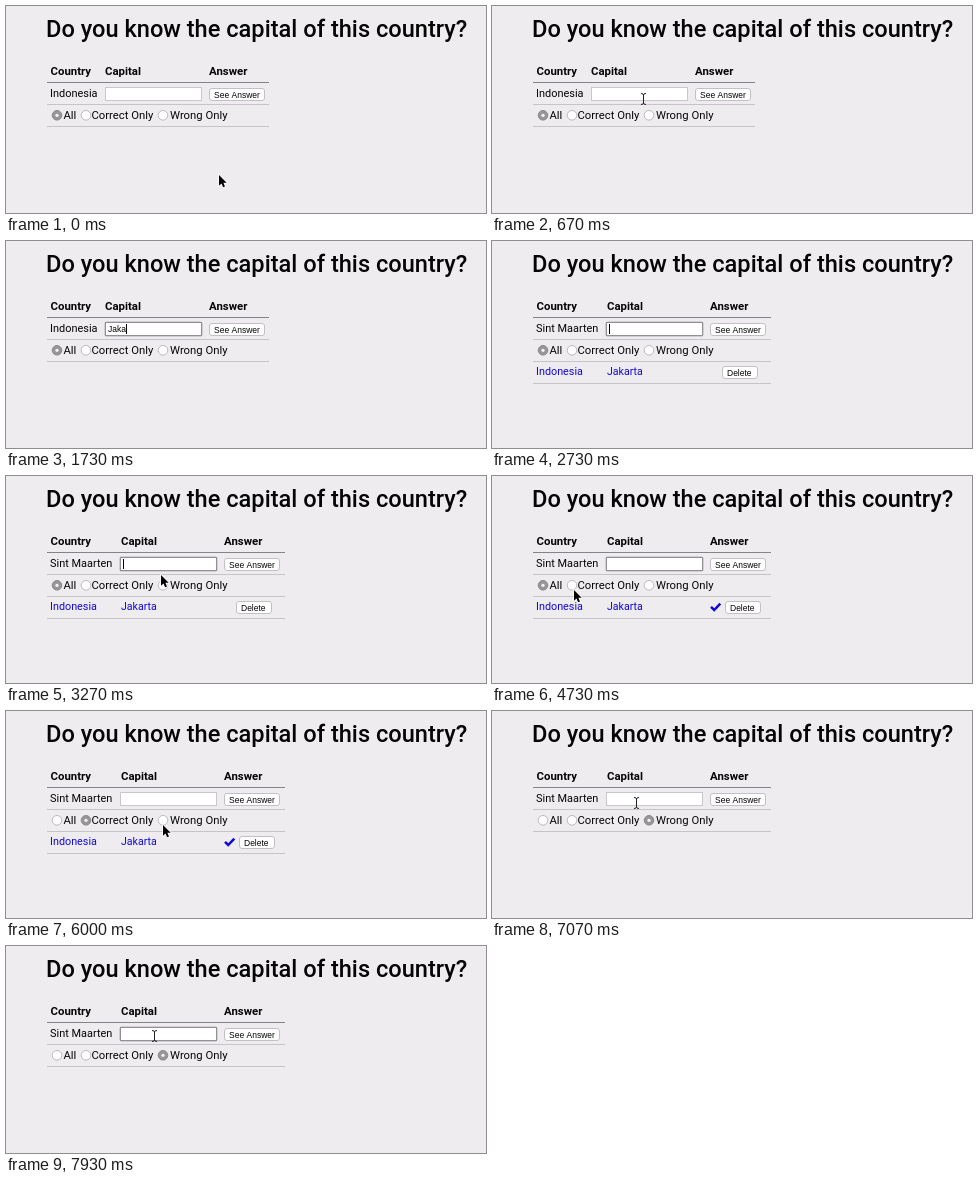
An HTML page with a canvas that plays this animation: 480x207 px, repeating every 8 s.

```html
<!DOCTYPE html>
<html lang="en">
<head>
<meta charset="utf-8">
<title>Capital quiz</title>
<style>
  html, body { margin: 0; width: 100%; height: 100%; overflow: hidden; background: #eeecef; }
  canvas { display: block; width: 480px; height: 207px; }
</style>
</head>
<body>
<canvas id="stage"></canvas>
<script>
const W = 480, H = 207, LOOP = 8000, STEP = 1000 / 15;
const BODY = 'Roboto, "Noto Sans", sans-serif';
const UI = '"Liberation Sans", Arial, sans-serif';
const INK = '#050505', BLUE = '#1208dc';

const canvas = document.getElementById('stage');
const ctx = canvas.getContext('2d');
const dpr = window.devicePixelRatio || 1;
canvas.width = W * dpr;
canvas.height = H * dpr;

// Moments of the session, in ms
const FOCUS = 930, SUBMIT = 2730, CHECKED = 3400;
const PICK_CORRECT = 4930, PICK_WRONG = 6260, REFOCUS = 7860;
const HIDE_CURSOR = 1200, SHOW_CURSOR = 3000;
const KEYS = [1230, 1380, 1540, 1680, 1840, 1990, 2150];

// Pointer path: time, x, y
const PATH = [
  [0, 213, 169], [130, 213, 168], [720, 150, 91], [1200, 148, 90],
  [3000, 149, 91], [3270, 155, 99], [3800, 222, 137], [4150, 218, 135],
  [4600, 84, 115], [4730, 82, 114], [4980, 81, 112], [5270, 110, 146],
  [5560, 128, 147], [5900, 156, 115], [6000, 157, 114], [6320, 157, 110],
  [6680, 156, 108], [7000, 145, 93], [7070, 144, 92], [7500, 148, 90], [8000, 148, 90]
];

function pointerAt(t) {
  let i = 1;
  while (i < PATH.length - 1 && PATH[i][0] < t) i++;
  const [t0, x0, y0] = PATH[i - 1], [t1, x1, y1] = PATH[i];
  const p = Math.min(1, (t - t0) / (t1 - t0));
  const e = p * p * (3 - 2 * p);
  return [x0 + (x1 - x0) * e, y0 + (y1 - y0) * e];
}

function text(str, x, y, size, weight = 400, color = INK, family = BODY) {
  ctx.font = `${weight} ${size}px ${family}`;
  ctx.fillStyle = color;
  ctx.fillText(str, x, y);
}

function rule(y, right, color) {
  ctx.fillStyle = color;
  ctx.fillRect(41, y, right - 41, 1);
}

function button(label, x, y, w) {
  ctx.beginPath();
  ctx.roundRect(x + 0.5, y + 0.5, w - 1, 12, 2.5);
  ctx.fillStyle = '#fff';
  ctx.fill();
  ctx.strokeStyle = '#c2c0c3';
  ctx.lineWidth = 1;
  ctx.stroke();
  text(label, x + 5, y + 9.5, 8.5, 400, INK, UI);
}

function radio(label, x, labelX, on) {
  ctx.beginPath();
  ctx.arc(x, 109.3, 4.8, 0, 7);
  ctx.fillStyle = on ? '#989698' : '#fff';
  ctx.fill();
  ctx.strokeStyle = on ? '#858385' : '#b5b3b6';
  ctx.lineWidth = 0.9;
  ctx.stroke();
  if (on) {
    ctx.beginPath();
    ctx.arc(x, 109.3, 1.6, 0, 7);
    ctx.fillStyle = '#f4f4f4';
    ctx.fill();
  }
  text(label, labelX, 113, 11.3);
}

function input(x, value, focused, caret) {
  if (focused) {
    ctx.beginPath();
    ctx.roundRect(x - 1.5, 80.5, 98, 15, 2);
    ctx.fillStyle = '#b4b2b6';
    ctx.fill();
  }
  ctx.fillStyle = '#fff';
  ctx.fillRect(x, 82, 95, 12);
  ctx.strokeStyle = focused ? '#929094' : '#c9c7ca';
  ctx.lineWidth = 1;
  ctx.strokeRect(x - 0.5, 81.5, 96, 13);
  text(value, x + 2, 91, 8.5, 400, INK, UI);
  if (caret) {
    const end = x + 2 + Math.round(ctx.measureText(value).width);
    ctx.fillRect(end, 83, 1, 10);
  }
}

function checkMark() {
  ctx.beginPath();
  ctx.moveTo(219, 130.8);
  ctx.lineTo(222.2, 134);
  ctx.lineTo(228.3, 127.6);
  ctx.strokeStyle = BLUE;
  ctx.lineWidth = 2.5;
  ctx.stroke();
}

function arrow(x, y) {
  ctx.save();
  ctx.translate(x, y);
  ctx.beginPath();
  [[0, 0], [0, 10.8], [2.5, 8.5], [4.1, 12.2], [6, 11.4], [4.4, 7.7], [7.7, 7.7]]
    .forEach(([px, py]) => ctx.lineTo(px, py));
  ctx.closePath();
  ctx.lineJoin = 'round';
  ctx.strokeStyle = '#fff';
  ctx.lineWidth = 1.5;
  ctx.stroke();
  ctx.fillStyle = '#000';
  ctx.fill();
  ctx.restore();
}

function beam(x, y) {
  ctx.save();
  ctx.translate(Math.round(x) + 0.5, Math.round(y));
  ctx.beginPath();
  ctx.moveTo(-2.5, -5.5);
  ctx.quadraticCurveTo(0, -5.5, 0, -4);
  ctx.lineTo(0, 4);
  ctx.quadraticCurveTo(0, 5.5, -2.5, 5.5);
  ctx.moveTo(2.5, -5.5);
  ctx.quadraticCurveTo(0, -5.5, 0, -4);
  ctx.moveTo(0, 4);
  ctx.quadraticCurveTo(0, 5.5, 2.5, 5.5);
  ctx.strokeStyle = '#222';
  ctx.lineWidth = 1;
  ctx.stroke();
  ctx.restore();
}

function caretOn(t) {
  if (t < SUBMIT) {
    return t >= KEYS[0] || (t - FOCUS) % 1060 < 530;
  }
  return t < PICK_CORRECT && (t - SUBMIT) % 1060 < 570;
}

function draw(t) {
  const answered = t >= SUBMIT;
  const shift = answered ? 15.5 : 0;
  const right = answered ? 279 : 263;
  const capitalX = 99 + Math.round(shift);
  const answerX = 203 + Math.floor(shift);
  const inputX = 100 + Math.floor(shift);
  const filter = t < PICK_CORRECT ? 0 : t < PICK_WRONG ? 1 : 2;
  const focused = (t >= FOCUS && t < PICK_CORRECT) || t >= REFOCUS;
  const typed = answered ? '' : 'Jakarta'.slice(0, KEYS.filter(k => t >= k).length);

  ctx.setTransform(dpr, 0, 0, dpr, 0, 0);
  ctx.fillStyle = '#eeecef';
  ctx.fillRect(0, 0, W, H);

  text('Do you know the capital of this country?', 40, 31, 23.6, 500);

  text('Country', 44.5, 68.5, 11.4, 700);
  text('Capital', capitalX, 68.5, 11.4, 700);
  text('Answer', answerX, 68.5, 11.4, 700);
  rule(76, right, '#858387');

  text(answered ? 'Sint Maarten' : 'Indonesia', 44, 90.7, 10.95);
  input(inputX, typed, focused, focused && caretOn(t));
  button('See Answer', answerX, 82, 56);
  rule(98, right, '#c6c4c7');

  radio('All', 51, 57.5, filter === 0);
  radio('Correct Only', 80, 85.5, filter === 1);
  radio('Wrong Only', 157, 164, filter === 2);
  rule(120, right, '#c6c4c7');

  if (answered && filter < 2) {
    const checked = t >= CHECKED;
    text('Indonesia', 44, 134.3, 10.8, 400, BLUE);
    text('Jakarta', 115, 134.3, 10.6, 400, BLUE);
    if (checked) checkMark();
    button('Delete', checked ? 233 : 230, 125, 36);
    rule(142, right, '#c6c4c7');
  }

  if (t < HIDE_CURSOR || t >= SHOW_CURSOR) {
    const [x, y] = pointerAt(t);
    const overInput = x > inputX && x < inputX + 96 && y > 81 && y < 95;
    (overInput ? beam : arrow)(x, y);
  }
}

const start = performance.now();
function tick() {
  const t = (performance.now() - start) % LOOP;
  draw(Math.floor((t + 5) / STEP) * STEP % LOOP);
  requestAnimationFrame(tick);
}
tick();
</script>
</body>
</html>
```
